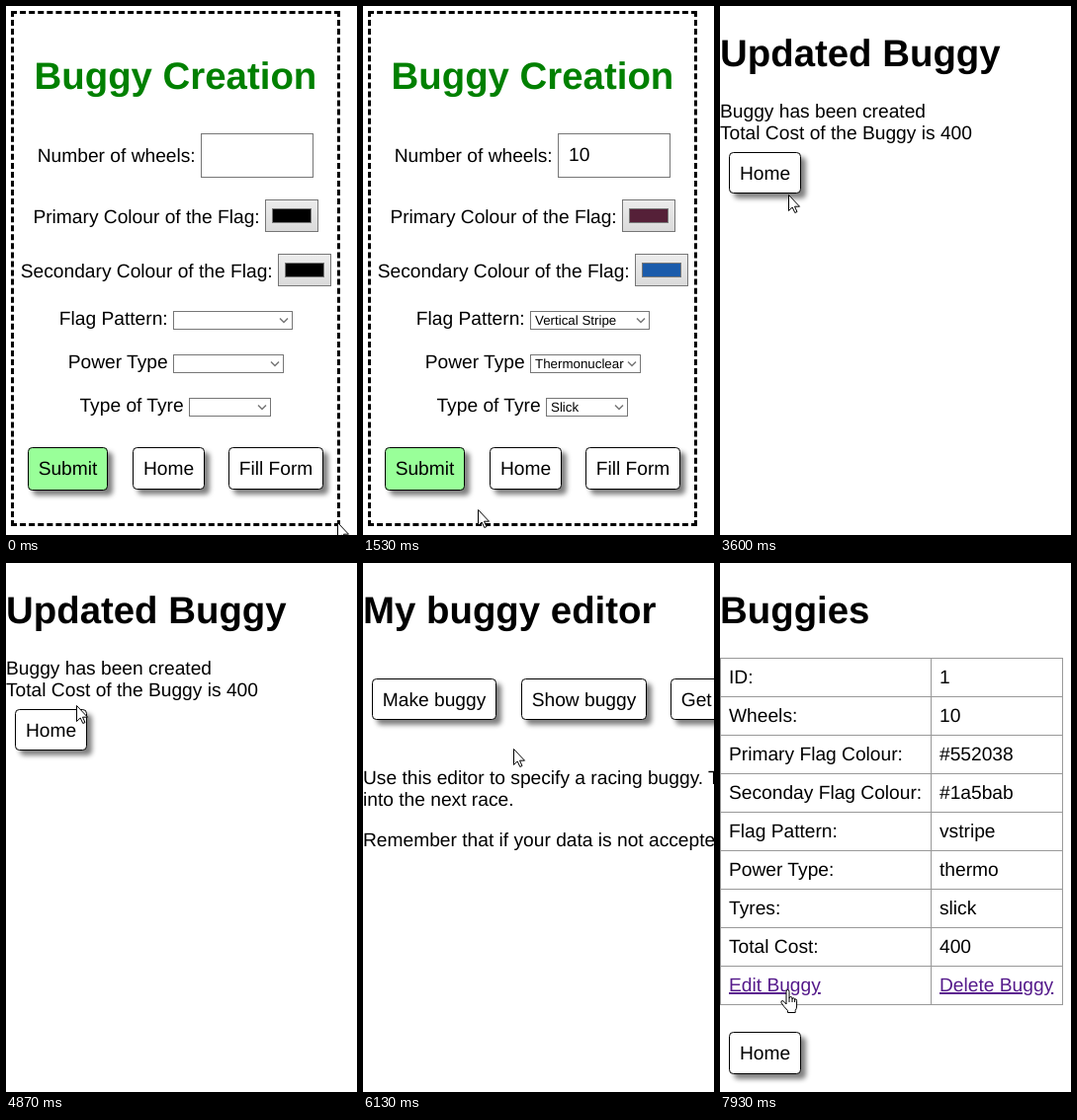
These frames come from a looping animation (355x536 px, 8 s). An HTML page:

```html
<!DOCTYPE html>
<html lang="en">
<head>
<meta charset="utf-8">
<title>Buggy editor</title>
<style>
  html, body { margin: 0; width: 100%; height: 100%; overflow: hidden; background: #fff; }
  #outline {
    position: absolute; left: 5px; top: 5px; width: 333px; height: 522px;
    box-sizing: border-box; border: 3px dashed #000;
  }
  svg { position: absolute; left: 0; top: 0; }
  text {
    font: 19.2px "Liberation Sans", Arial, sans-serif;
    text-rendering: geometricPrecision; white-space: pre;
  }
  .title { font-size: 38.4px; font-weight: bold; }
  .small { font-size: 13.33px; }
  .label { text-anchor: end; }
  .caption { text-anchor: middle; }
  .link { fill: #551a8b; text-decoration: underline; }
  .button { stroke: #000; filter: drop-shadow(5px 5px 2.5px #808080); }
  .field { fill: #fff; stroke: #767676; }
  .cursor { fill: #fff; stroke: #000; stroke-linejoin: round; }
</style>
</head>
<body>
<div id="outline"></div>
<svg width="355" height="536" viewBox="0 0 355 536">
  <defs>
    <linearGradient id="well" x2="0" y2="1">
      <stop stop-color="#ececec"/><stop offset="1" stop-color="#dadada"/>
    </linearGradient>
  </defs>
  <g id="scene"></g>
</svg>
<script>
const TICKS = 120, TICKS_PER_MS = 0.015;
const GREEN = '#99ff99';
const scene = document.getElementById('scene');
const outline = document.getElementById('outline');

const text = (x, y, s, cls = '') => `<text x="${x}" y="${y}" class="${cls}">${s}</text>`;
const title = s => text(0, 61, s, 'title');

// Boxes take outer edges; the one-pixel stroke lies inside them.
const box = (x, y, w, h, attrs) =>
  `<rect x="${x + .5}" y="${y + .5}" width="${w - 1}" height="${h - 1}" ${attrs}/>`;

const inside = (p, { x, y, w, h }) => p.x >= x && p.x < x + w && p.y >= y && p.y < y + h;

const button = (b, pointer) => {
  const fill = b.green || inside(pointer, b) ? GREEN : '#fff';
  return box(b.x, b.y, b.w, b.h, `rx="4" class="button" fill="${fill}"`) +
    text(b.x + b.w / 2, b.y + 28, b.name, 'caption');
};

const makeButton = (name, x, y, w, h, more) => ({ name, x, y, w, h, ...more });

const colourInput = (x, y, colour) =>
  box(x, y, 54, 33, 'fill="url(#well)" stroke="#767676"') +
  box(x + 7, y + 9, 40, 15, `fill="${colour}" stroke="#777"`);

const select = (x, y, w, value) =>
  box(x, y, w, 19, 'class="field"') + text(x + 5, y + 14, value, 'small') +
  `<path d="M${x + w - 13} ${y + 7.5}l4 4 4-4" fill="none" stroke="#767676" stroke-width="1.5"/>`;

const formPage = {
  buttons: [
    makeButton('Submit', 22, 447, 81, 44, { green: true }),
    makeButton('Home', 128, 447, 73, 43, { link: true }),
    makeButton('Fill Form', 225, 447, 96, 43)
  ],
  draw(tick) {
    const filled = tick >= 7;
    const when = (value, empty = '') => filled ? value : empty;
    const labels = [
      ['Number of wheels:', 191.7, 158],
      ['Primary Colour of the Flag:', 256.7, 220],
      ['Secondary Colour of the Flag:', 269.7, 275],
      ['Flag Pattern:', 163.7, 323],
      ['Power Type', 163.7, 367],
      ['Type of Tyre', 179.7, 411]
    ];
    return `<g fill="#008000">${text(28.5, 84, 'Buggy Creation', 'title')}</g>` +
      labels.map(([s, x, y]) => text(x, y, s, 'label')).join('') +
      box(197, 129, 114, 45, 'class="field"') + text(208, 157, when('10')) +
      colourInput(262, 196, when('#552038', '#000')) +
      colourInput(275, 251, when('#1a5bab', '#000')) +
      select(169, 309, 121, when('Vertical Stripe')) +
      select(169, 353, 112, when('Thermonuclear')) +
      select(185, 397, 83, when('Slick'));
  }
};

const updatedPage = {
  buttons: [makeButton('Home', 9, 148, 73, 42, { link: true })],
  draw: () => title('Updated Buggy') +
    text(0, 113, 'Buggy has been created') +
    text(0, 135, 'Total Cost of the Buggy is 400')
};

const editorPage = {
  buttons: [
    makeButton('Make buggy', 9, 117, 126, 42, { link: true }),
    makeButton('Show buggy', 160, 117, 127, 42, { link: true }),
    makeButton('Get buggy', 311, 117, 110, 42, { link: true })
  ],
  draw: () => title('My buggy editor') +
    text(0, 224, 'Use this editor to specify a racing buggy. Then enter it') +
    text(0, 246, 'into the next race.') +
    text(0, 287, 'Remember that if your data is not accepted')
};

const tablePage = {
  buttons: [makeButton('Home', 9, 475, 73, 43, { link: true })],
  links: [{ x: 9, y: 417, w: 92, h: 22 }],
  draw() {
    const rows = [
      ['ID:', '1'], ['Wheels:', '10'],
      ['Primary Flag Colour:', '#552038'], ['Seconday Flag Colour:', '#1a5bab'],
      ['Flag Pattern:', 'vstripe'], ['Power Type:', 'thermo'],
      ['Tyres:', 'slick'], ['Total Cost:', '400'],
      ['Edit Buggy', 'Delete Buggy']
    ];
    return title('Buggies') + rows.map(([name, value], i) => {
      const y = 96 + 39 * i, cls = i === 8 ? 'link' : '';
      return box(0, y, 214, 40, 'fill="none" stroke="#999"') +
        box(213, y, 134, 40, 'fill="none" stroke="#999"') +
        text(9, y + 26, name, cls) + text(222, y + 26, value, cls);
    }).join('');
  }
};

const pageAt = tick =>
  tick < 41 ? formPage : tick < 84 ? updatedPage : tick < 106 ? editorPage : tablePage;

// Pointer stops: tick, x, y
const stops = [
  [0, 335, 523], [5, 270, 465], [6, 270, 465], [8, 268, 467], [20, 268, 467],
  [22, 195, 500], [23, 116, 510], [29, 89, 486], [30, 89, 486], [33, 86, 479],
  [41, 86, 479], [53, 70, 194], [55, 68, 188], [69, 68, 188], [73, 71, 144],
  [75, 71, 144], [79, 66, 163], [85, 66, 163], [92, 152, 188], [96, 178, 155],
  [99, 187, 144], [107, 187, 144], [118, 69, 429], [119, 68, 432]
];

function pointerAt(tick) {
  const next = Math.max(1, stops.findIndex(s => s[0] >= tick));
  const [t0, x0, y0] = stops[next - 1], [t1, x1, y1] = stops[next];
  const k = (tick - t0) / (t1 - t0);
  return { x: Math.round(x0 + (x1 - x0) * k), y: Math.round(y0 + (y1 - y0) * k) };
}

const ARROW = 'M.5.5V16.5L4.2 13l2.6 5.5 2.2-1-2.5-5.3h5z';
const HAND = 'M6 15V2.5q0-2 1.5-2t1.5 2V9q0-1.5 1.5-1.5T12 9v1q0-1.2 1.3-1.2t1.3 1.4v.8' +
  'q0-1.1 1-1.1t1 1.5V17q0 2.5-1.4 4.5v2H7.5v-2Q3 17 1 13.5q-.4-2 1.2-2Q4 12 6 15z' +
  'M9 9v4M12 10v3M14.6 11v2';

function cursor(p, page) {
  const links = [...page.buttons.filter(b => b.link), ...(page.links || [])];
  const hand = links.some(l => inside(p, l));
  return `<path class="cursor" transform="translate(${p.x - (hand ? 7 : 0)} ${p.y})" d="${hand ? HAND : ARROW}"/>`;
}

function render(tick) {
  const page = pageAt(tick), pointer = pointerAt(tick);
  outline.style.display = page === formPage ? '' : 'none';
  // The cursor shape outlives a page change until the mouse moves.
  scene.innerHTML = page.draw(tick) +
    page.buttons.map(b => button(b, pointer)).join('') +
    cursor(pointer, pageAt(Math.max(0, tick - 2)));
}

let shown = -1;
function loop() {
  const tick = Math.floor(performance.now() * TICKS_PER_MS + .06) % TICKS;
  if (tick !== shown) render(shown = tick);
  requestAnimationFrame(loop);
}
loop();
</script>
</body>
</html>
```
